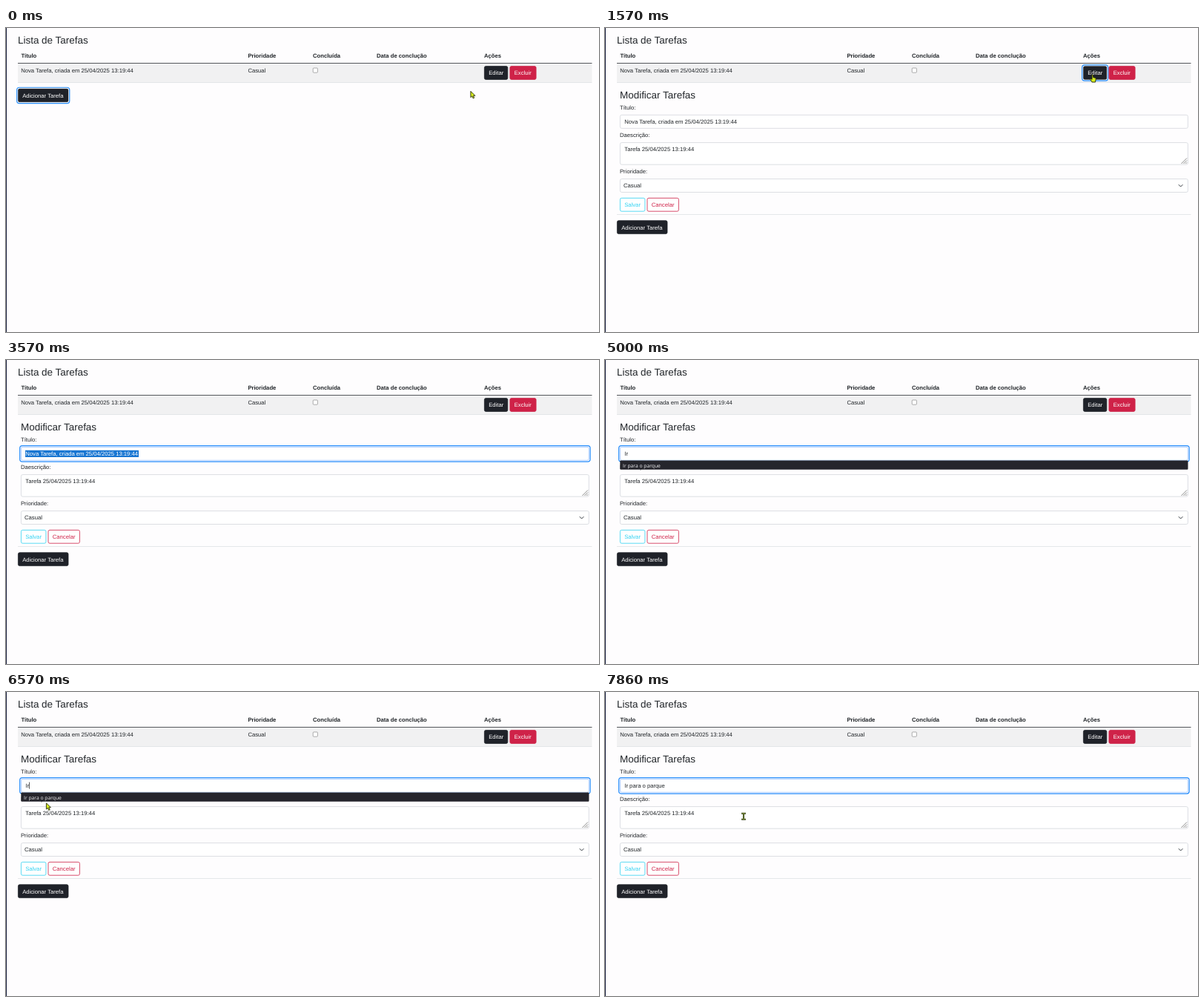
An HTML page for the animation above (8 s loop, 800 px wide and 410 px high).

```html
<!DOCTYPE html>
<html lang="pt-BR">
<head>
<meta charset="utf-8">
<title>Lista de Tarefas</title>
<style>
  html, body { margin: 0; width: 100%; height: 100%; overflow: hidden; background: #fefdfe; }
  svg { display: block; width: 800px; height: 410px; }
  text { font: 7.68px "Liberation Sans", Arial, sans-serif; fill: #212529; text-rendering: geometricPrecision; white-space: pre; }
  .title { font-size: 13.44px; }
  .bold { font-weight: bold; }
  .light { fill: #fff; }
  .field { fill: #fff; stroke: #d3d7dc; stroke-width: .8; }
  .popup { font: 6.75px "Open Sans", "Noto Sans", sans-serif; fill: #f1f1f3; }
  #cursors path { stroke-linejoin: round; }
</style>
</head>
<body>
<svg id="stage" viewBox="0 0 800 410">
  <defs><clipPath id="selected"><rect id="clip" y="121.5" height="9.5"/></clipPath></defs>
  <rect width="800" height="410" fill="#fefdfe"/>
  <rect width="1" height="410" fill="#1b2140"/>
  <g id="list"></g>
  <g id="form"></g>
  <g id="add"></g>
  <g id="cursors">
    <path id="arrow" d="M.4 .3V8.6L2.3 6.9L3.7 9.9L5.2 9.2L3.8 6.3H6.4Z" fill="#d9f01c" stroke="#23280c" stroke-width=".9"/>
    <path id="hand" d="M-.8 .8Q0 -.2 .8 .8V4L3.6 4.7Q4.6 5 4.4 6.2L3.7 10.4H-.8L-3.2 6.6Q-3 5.4 -1.8 6L-.8 6.8Z" fill="#d9f01c" stroke="#23280c" stroke-width=".9"/>
    <g id="beam">
      <path d="M-2.9 -4H2.9M0 -4V4M-2.9 4H2.9" fill="none" stroke="#2e3a1a" stroke-width="2.1"/>
      <path d="M-2.4 -4H2.4M0 -4V4M-2.4 4H2.4" fill="none" stroke="#8c9c3c" stroke-width=".8"/>
    </g>
  </g>
</svg>
<script>
const LOOP = 8000, STEP = 1000 / 7;
const OLD_TITLE = 'Nova Tarefa, criada em 25/04/2025 13:19:44';
const NEW_TITLE = 'Ir para o parque';
const DARK = '#1f2229', RED = '#cf2248', CYAN = '#31d2f2';
const $ = id => document.getElementById(id);

function add(parent, tag, attrs, content = '') {
  const el = document.createElementNS('http://www.w3.org/2000/svg', tag);
  for (const key in attrs) el.setAttribute(key, attrs[key]);
  el.textContent = content;
  parent.append(el);
  return el;
}
const label = (parent, x, y, content, cls = '') => add(parent, 'text', { x, y, class: cls }, content);
const box = (parent, x, y, width, height, attrs) => add(parent, 'rect', { x, y, width, height, ...attrs });

function ring(parent, x, y, w, h) {
  const group = add(parent, 'g', { fill: 'none' });
  const edge = (gap, stroke, width) => box(group, x - gap, y - gap, w + 2 * gap, h + 2 * gap,
    { rx: 2 + gap, stroke, 'stroke-width': width });
  edge(.4, '#fff', .8);
  edge(1.35, '#258cfb', 1.2);
  return group;
}
function button(parent, x, y, w, content, color, outline) {
  box(parent, x + .4, y + .4, w - .8, 17.8,
    { rx: 2, fill: outline ? '#fff' : color, stroke: color, 'stroke-width': .8 });
  label(parent, x + 6.2, y + 12.2, content, outline ? '' : 'light').style.fill = outline ? color : '#fff';
}

// Task list
const list = $('list');
label(list, 16, 20.7, 'Lista de Tarefas', 'title');
[[20.4, 'Título'], [326.4, 'Prioridade'], [414, 'Concluída'], [500, 'Data de conclução'], [645, 'Ações']]
  .forEach(([x, name]) => label(list, x, 40.3, name, 'bold'));
box(list, 16, 47, 774.5, 26.5, { fill: '#f1f1f2' });
box(list, 16, 47, 774.5, .9, { fill: '#44474b' });
box(list, 16, 73.2, 774.5, .7, { fill: '#dcdfe3' });
label(list, 20.2, 60, OLD_TITLE);
label(list, 326.4, 60, 'Casual');
box(list, 414.2, 54, 6.2, 6.2, { rx: 1, fill: '#fff', stroke: '#777', 'stroke-width': .6 });
button(list, 645, 51.2, 32.2, 'Editar', DARK);
button(list, 679.5, 51.2, 36, 'Excluir', RED);
const editRing = ring(list, 645, 51.2, 32.2, 18.6);

// Edit form
const form = $('form');
label(form, 20, 94.7, 'Modificar Tarefas', 'title');
label(form, 20, 109.7, 'Título:');
label(form, 20, 147.3, 'Daescrição:');
label(form, 20, 196.2, 'Prioridade:');
const field = (y, h) => box(form, 20.4, y, 766, h, { rx: 2.2, class: 'field' });
const titleField = field(117.3, 18);
field(154.6, 29.6);
field(203.6, 17.9);
label(form, 26.3, 166, 'Tarefa 25/04/2025 13:19:44');
label(form, 25, 215, 'Casual');
add(form, 'path', { d: 'M773.8 211.2L776.6 214L779.4 211.2', fill: 'none', stroke: '#343a40', 'stroke-width': 1 });
add(form, 'path', { d: 'M777.5 183L785 175.5M780.5 183L785 178.5M783.3 183L785 181.3', stroke: '#555', 'stroke-width': .7 });
button(form, 20, 229, 34.3, 'Salvar', CYAN, true);
button(form, 56.6, 229, 43.2, 'Cancelar', RED, true);
box(form, 16, 251.2, 774.5, .7, { fill: '#dcdfe3' });
const titleRing = ring(form, 20, 116.9, 766.8, 18.8);
const titleText = label(form, 26.3, 128.8, OLD_TITLE);
const selection = add(form, 'g', { 'clip-path': 'url(#selected)' });
box(selection, 0, 121.5, 200, 9.5, { fill: '#1876d2' });
label(selection, 26.3, 128.8, OLD_TITLE, 'light');
const caret = box(form, 0, 121.6, .7, 9, { fill: '#111' });
const popup = add(form, 'g', {});
const popupRow = box(popup, 20.3, 135.6, 766.2, 12.2, { rx: 1, fill: '#25252c' });
label(popup, 24, 144.6, NEW_TITLE, 'popup');

const addButton = $('add');
button(addButton, 16, 81.6, 68.4, 'Adicionar Tarefa', DARK);
const addRing = ring(addButton, 16, 81.6, 68.4, 18.6);

// Pointer path: time, x, y
const path = [
  [0, 626.5, 85], [140, 627, 85], [1000, 658.5, 62.5], [1570, 658.5, 62.5],
  [2570, 179, 126.5], [2714, 72, 127.3], [3000, 25, 127], [6000, 25, 127],
  [6571, 54, 149.5], [7000, 58, 145], [7143, 60, 145], [7429, 60, 145],
  [7857, 187, 167.7], [8000, 187, 167.7]
];
// Selection start: time, x
const drag = [[2570, 179], [2714, 122], [2857, 60], [3000, 26], [4000, 26]];

function sample(keys, t) {
  const i = Math.max(1, keys.findIndex(k => k[0] >= t));
  const [a, b] = [keys[i - 1], keys[i]];
  const p = Math.min(1, Math.max(0, (t - a[0]) / (b[0] - a[0])));
  return a.slice(1).map((v, n) => v + (b[n + 1] - v) * p);
}
const within = (t, from, to) => t >= from && t < to;
const show = (el, on) => { el.style.visibility = on ? 'visible' : 'hidden'; };

function pointerKind(t, x, y) {
  if (within(t, 3560, 6100)) return '';
  if (x > 645 && x < 677 && y > 51 && y < 70) return 'hand';
  if (t < 1560) return 'arrow';
  const overPopup = within(t, 4200, 7420) && y > 135.5;
  const overText = x > 20 && (y > 117 && y < 135.5 || y > 154.5 && y < 184);
  return overText && !overPopup ? 'beam' : 'arrow';
}

function render(time) {
  const t = Math.floor((time % LOOP + 5) / STEP) * STEP;
  const open = t > 1560, focused = t > 2700;
  form.style.display = open ? '' : 'none';
  addButton.setAttribute('transform', `translate(0 ${open ? 177.8 : 0})`);
  show(addRing, t < 990);
  show(editRing, within(t, 990, 2700));
  titleRing.style.opacity = !focused ? 0 : t < 2850 ? .45 : 1;
  titleField.style.stroke = focused ? '#86b7fe' : '';

  const typed = t < 4130 ? OLD_TITLE : t < 4420 ? 'I' : t < 6990 ? 'Ir' : NEW_TITLE;
  if (titleText.textContent !== typed) titleText.textContent = typed;
  const start = sample(drag, Math.min(t, 4000))[0];
  $('clip').setAttribute('x', start);
  $('clip').setAttribute('width', Math.max(0, 179 - start));
  selection.style.display = within(t, 2700, 4130) ? '' : 'none';

  const caretOn = within(t, 4130, 4990) || within(t, 5420, 5990) || within(t, 6420, 6990) || within(t, 7420, 7850);
  caret.style.display = caretOn ? '' : 'none';
  caret.setAttribute('x', { I: 28.7, Ir: 31.2 }[typed] || 81.2);
  popup.style.display = within(t, 4280, 7420) ? '' : 'none';
  popupRow.setAttribute('fill', t > 6990 ? '#3b3b43' : '#25252c');

  const [x, y] = sample(path, t);
  const kind = pointerKind(t, x, y);
  for (const id of ['arrow', 'hand', 'beam']) {
    $(id).style.display = id === kind ? '' : 'none';
    $(id).setAttribute('transform', `translate(${x} ${y})`);
  }
}

const began = performance.now();
function frame() {
  render(performance.now() - began);
  requestAnimationFrame(frame);
}
frame();
</script>
</body>
</html>
```
